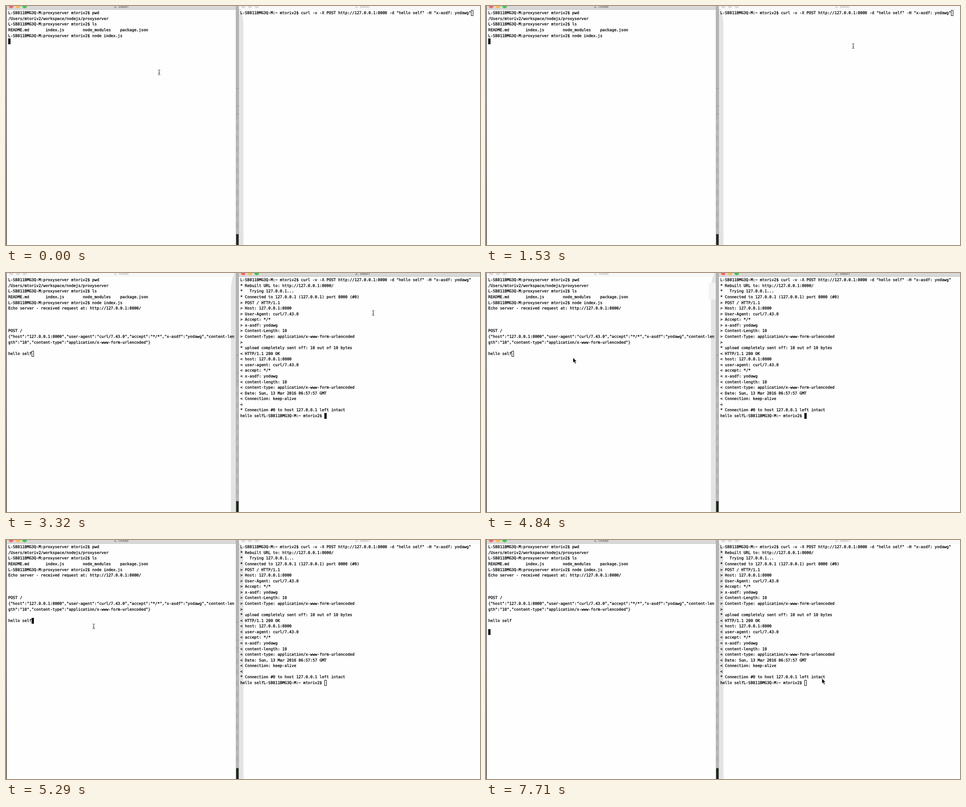
Write an HTML page that moves like this. It is 1054x531 px and loops after 8 s.

```html
<!DOCTYPE html>
<html lang="en">
<head>
<meta charset="utf-8">
<title>Echo server</title>
<style>
html, body { margin: 0; width: 100%; height: 100%; overflow: hidden; background: #fff; }
#stage { position: relative; width: 1054px; height: 531px; overflow: hidden; background: #fefefe; }
svg { position: absolute; left: 0; top: 0; }
pre, .caret { position: absolute; margin: 0; }
pre {
  top: 10.2px; color: #000; white-space: pre;
  font: 8.612px/12.58px "DejaVu Sans Mono", monospace;
  -webkit-text-stroke: .3px #000;
  text-rendering: geometricPrecision; font-variant-ligatures: none;
}
.caret { width: 5px; height: 13px; box-sizing: border-box; border: 1px solid #000; }
.title { font: 9.8px "Liberation Sans", Arial, sans-serif; text-anchor: middle; text-rendering: geometricPrecision; }
</style>
</head>
<body>
<div id="stage">
  <svg width="1054" height="531">
    <defs>
      <linearGradient id="edge" x2="0" y2="1">
        <stop offset="0" stop-color="#33425c"/>
        <stop offset=".4" stop-color="#26364e"/>
        <stop offset=".8" stop-color="#111"/>
      </linearGradient>
      <pattern id="bands" width="7" height="24" patternUnits="userSpaceOnUse">
        <path d="M0 0h7v12h-7z" fill="#b2b2b2"/>
        <path d="M0 12h7v12h-7z" fill="#bababa"/>
      </pattern>
    </defs>
    <rect width="1.3" height="531" fill="url(#edge)"/>
    <g id="bars"></g>
    <path id="shadow" fill="#e4e4e4"/>
    <path id="thumb" d="M495 22h16v37h-16z" fill="#f3f3f3"/>
    <path d="M511.5 0h6v240h-6z" fill="#b4b4b4"/>
    <path d="M511.5 240h6v267h-6z" fill="url(#bands)"/>
    <path d="M511.5 182.5h6m-6 40h6m-6 17.5h6" stroke="#8c8c8c"/>
    <path d="M511.5 507h6v24h-6z" fill="#202820"/>
    <path d="M511.5 0v507m6-507v507" stroke="#999" stroke-width=".6"/>
  </svg>
  <pre id="left" style="left:5px"></pre>
  <pre id="right" style="left:521px"></pre>
  <div class="caret" id="caretL"></div>
  <div class="caret" id="caretR"></div>
  <svg width="1054" height="531">
    <path id="arrow" d="M0 0v11.5l2.6-2.4 2 4.6 2-.9-2-4.400h3.600z" fill="#000" stroke="#fff" stroke-width=".7"/>
    <path id="beam" d="M-2.5-5.5q2 0 2.5 1.3 .5-1.3 2.5-1.3M-2.5 5.5q2 0 2.5-1.3 .5 1.3 2.5 1.3M0-4.5v9M-1.3 1.5h2.6" fill="none" stroke="#222"/>
  </svg>
</div>
<script>
const LOOP = 8000, CELL = 5.185, ROW = 12.58;
const $ = id => document.getElementById(id);
const host = 'L-SB811BMG3Q-M:', user = 'mtoriv2$ ';
const prompt = host + 'proxyserver ' + user;

const shell = `${prompt}pwd
/Users/${user.slice(0, 7)}/workspace/nodejs/proxyserver
${prompt}ls
README.md       index.js        node_modules    package.json
${prompt}node index.js
`;
const served = shell + `Echo server - received request at: http://127.0.0.1:8000/



POST /
{"host":"127.0.0.1:8000","user-agent":"curl/7.43.0","accept":"*/*","x-asdf":"yodawg","content-len
gth":"10","content-type":"application/x-www-form-urlencoded"}

hello self`;
const command = `${host}~ ${user}curl -v -X POST http://127.0.0.1:8000 -d "hello self" -H "x-asdf: yodawg"`;
const reply = command + `
* Rebuilt URL to: http://127.0.0.1:8000/
*   Trying 127.0.0.1...
* Connected to 127.0.0.1 (127.0.0.1) port 8000 (#0)
> POST / HTTP/1.1
> Host: 127.0.0.1:8000
> User-Agent: curl/7.43.0
> Accept: */*
> x-asdf: yodawg
> Content-Length: 10
> Content-Type: application/x-www-form-urlencoded
>
* upload completely sent off: 10 out of 10 bytes
< HTTP/1.1 200 OK
< host: 127.0.0.1:8000
< user-agent: curl/7.43.0
< accept: */*
< x-asdf: yodawg
< content-length: 10
< content-type: application/x-www-form-urlencoded
< Date: Sun, 13 Mar 2016 06:57:57 GMT
< Connection: keep-alive
<
* Connection #0 to host 127.0.0.1 left intact
hello self${host}~ ${user}`;

// time, pointer shape, x, y (arrow tip or beam centre)
const pointer = [
  [0, 'beam', 340.5, 147.5], [450, 'beam', 437, 105], [630, 'arrow', 773.5, 37.5],
  [930, 'arrow', 807, 73.5], [1080, 'arrow', 814, 84.5], [1230, 'arrow', 815, 84.5],
  [1530, 'beam', 816.5, 89], [4400, 'beam', 580, 52], [4550, 'arrow', 215.5, 22.5],
  [4690, 'arrow', 209.5, 80.5], [4840, 'arrow', 193.5, 188], [5140, 'beam', 195, 192],
  [6820, 'beam', 369, 206], [6970, 'beam', 447, 231], [7110, 'arrow', 646.5, 247],
  [7260, 'arrow', 667, 258], [7410, 'arrow', 744.5, 301], [7560, 'arrow', 746, 307],
  [7710, 'arrow', 747, 307.5]
];

function bar(x, width, center, title, active) {
  const lights = active ? ['#fc605b', '#fdbc40', '#34c84a'] : Array(3).fill('#dadada');
  const dots = lights.map((c, i) => `<circle cx="${x + 10 + i * 15}" cy="0" r="5" fill="${c}"/>`).join('');
  return `<rect x="${x}" width="${width}" height="8" fill="${active ? '#d8d8d8' : '#f8f8f8'}"/>
    <rect x="${x}" y="7.5" width="${width}" height=".8" fill="${active ? '#b8b8b8' : '#f2f2f2'}"/>${dots}
    <text class="title" x="${center}" y="3.6" fill="${active ? '#555' : '#aaa'}">${title}</text>`;
}

function setCaret(el, x, text, solid) {
  const lines = text.split('\n');
  el.style.left = Math.round(x + lines.at(-1).length * CELL) + 'px';
  el.style.top = Math.floor(9.5 + (lines.length - 1) * ROW) + 'px';
  el.style.background = solid ? '#000' : 'none';
}

function draw(t) {
  const done = t >= 3320;
  const leftActive = t < 1680 || t >= 5290;
  const leftText = (done ? served : shell) + (t >= 6040 ? '\n' : '') + (t >= 6370 ? '\n' : '');
  const rightText = done ? reply : command;
  $('left').textContent = leftText;
  $('right').textContent = rightText;
  setCaret($('caretL'), 5, leftText, leftActive);
  setCaret($('caretR'), 521, rightText, !leftActive);

  $('bars').innerHTML =
    bar(1.5, 510, 256, t < 630 ? '1. bash' : '1. node', leftActive) +
    bar(517.5, 536.5, 792.5, '2. bash', !leftActive);
  $('shadow').setAttribute('d', t < 1680 || t >= 5140
    ? 'M517.5 8H521Q528 22 528 44V531H517.5z'
    : 'M511.5 0H508Q500 14 500 42V531H511.5z');
  $('thumb').style.display = t >= 4550 && t < 5140 ? '' : 'none';

  const [, shape, x, y] = pointer.findLast(p => p[0] <= t);
  for (const id of ['arrow', 'beam']) {
    $(id).style.display = id === shape ? '' : 'none';
    $(id).setAttribute('transform', `translate(${x} ${y})`);
  }
}

const start = performance.now();
function tick() {
  draw((performance.now() - start) % LOOP);
  requestAnimationFrame(tick);
}
tick();
</script>
</body>
</html>
```
